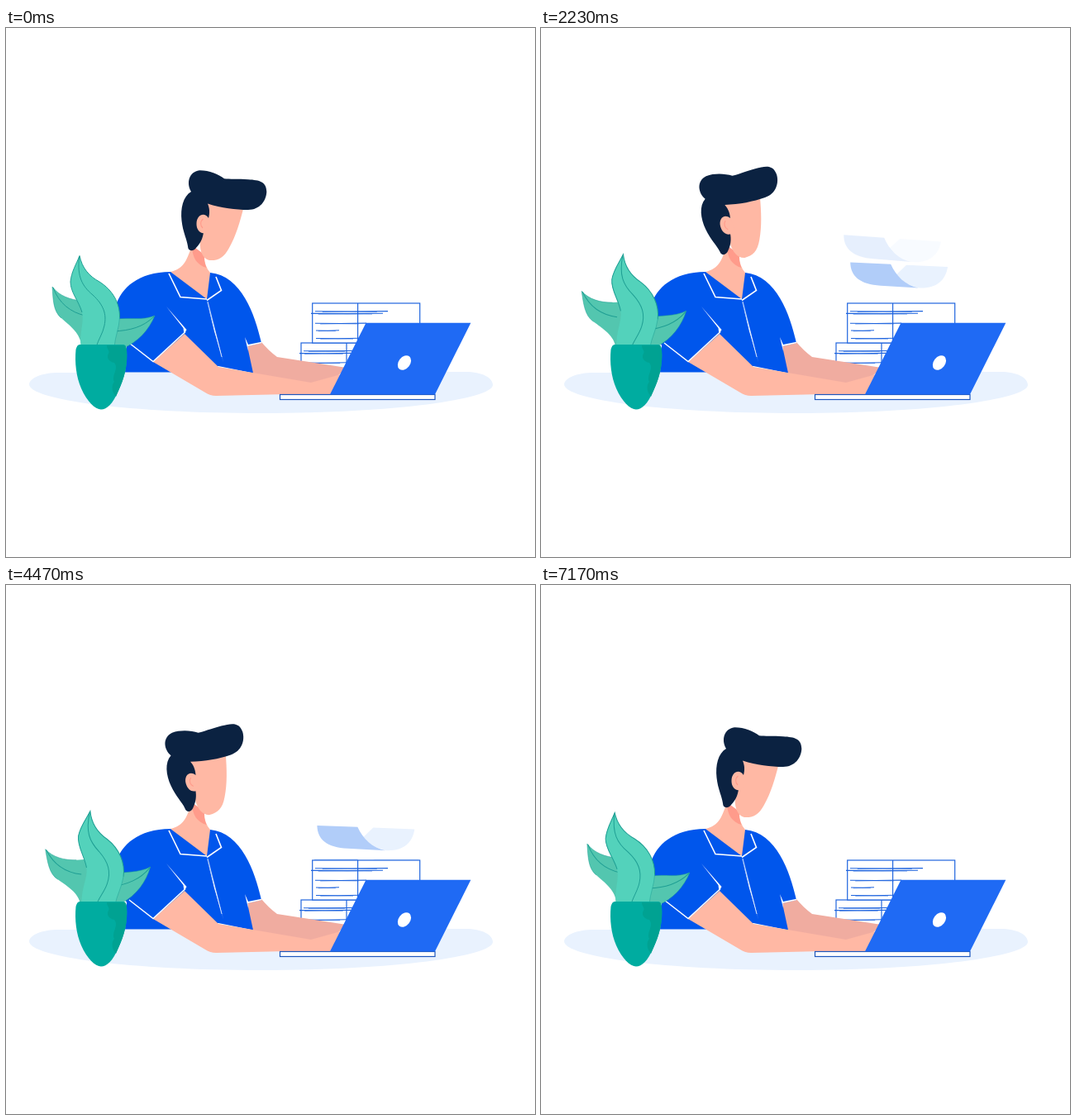
An HTML page with a canvas for the animation above (7.21 s loop, 640 px wide and 640 px high).

```html
<!DOCTYPE html>
<html lang="en">
<head>
<meta charset="utf-8">
<title>Working at a laptop</title>
<style>
  html, body { margin: 0; width: 100%; height: 100%; overflow: hidden; background: #fff; }
  canvas { display: block; width: 640px; height: 640px; }
</style>
</head>
<body>
<canvas id="stage" width="640" height="640"></canvas>
<script>
const ctx = document.getElementById('stage').getContext('2d');
const LOOP = 7210;

const C = {
  pale: '#e9f2fe', sheet: '#b1cdf9', shirt: '#0056ec', laptop: '#1f6af4', line: '#2065de',
  skin: '#ffb8a4', backSkin: '#f0aca0', blush: '#ff9b8b', hair: '#0b2241',
  pot: '#00aca0', potShade: '#00a292', leaf: '#53d2bb', sideLeaf: '#53c6af', vein: '#1f9f94'
};

const clamp = v => Math.max(0, Math.min(1, v));
const smooth = v => { v = clamp(v); return v * v * (3 - 2 * v); };

function fill(d, color) {
  ctx.fillStyle = color;
  ctx.fill(new Path2D(d));
}

function stroke(d, color, width = 1) {
  ctx.strokeStyle = color;
  ctx.lineWidth = width;
  ctx.stroke(new Path2D(d));
}

function oval(x, y, rx, ry, turn, color) {
  ctx.fillStyle = color;
  ctx.beginPath();
  ctx.ellipse(x, y, rx, ry, turn, 0, Math.PI * 2);
  ctx.fill();
}

function rotated(x, y, degrees, draw) {
  ctx.save();
  ctx.translate(x, y);
  ctx.rotate(degrees * Math.PI / 180);
  ctx.translate(-x, -y);
  draw();
  ctx.restore();
}

function table() {
  fill('M64 417 L556 416 C576 416 589 423 589 432 C588 449 470 466 310 466 ' +
       'C150 466 28 450 28 431 C29 423 44 417 64 417Z', C.pale);
}

// An open sheet that sways down and slips behind the books.
function sheet(t) {
  if (t < 0 || t > 4700) return;
  let x = 371 + 6 * Math.cos((t - 2900) * 0.0015);
  if (t > 2900) x = Math.max(373, x);
  const y = 244.5 + 0.0155 * t + 9e-7 * t * t;
  const tilt = 4.1 * (1 - Math.pow(t / 4300, 1.6));
  ctx.save();
  ctx.globalAlpha = clamp((t - 100) / 800);
  ctx.translate(x, y);
  ctx.rotate(tilt * Math.PI / 180);
  ctx.scale(1 + 0.07 * clamp((t - 3300) / 1000), 1);
  fill('M68 0 L118 0 C116 17 105 27 85 27 C72 25 63 20 56.5 12Z', C.pale);
  fill('M0 0 L49 0 C56 14 68 25 84 27 L38 26.5 C13 26 1 17 0 0Z', C.sheet);
  ctx.restore();
}

function book(x, y, w, h, spine) {
  ctx.fillStyle = '#fff';
  ctx.fillRect(x, y, w, h);
  ctx.strokeStyle = C.line;
  ctx.lineWidth = 1.2;
  ctx.strokeRect(x, y, w, h);
  stroke(`M${spine} ${y} V${y + h}`, C.line, 1.2);
}

function scribble(x1, x2, y) {
  const w = x2 - x1;
  stroke(`M${x1} ${y} L${x1 + w * .5} ${y + .2} L${x2} ${y - .2}`, C.line, 1.1);
  stroke(`M${x1 + w * .1} ${y + .7} L${x1 + w * .45} ${y + .4} L${x1 + w * .85} ${y + .6}`, C.line, .7);
}

function books() {
  book(357, 381, 130, 44, 412);
  book(370.7, 333, 130, 48, 425.6);
  [[374, 462, 342.8], [369, 456, 345.4], [374, 436, 357.3], [375, 403, 366], [375, 428, 375.5],
   [360, 419, 390.7], [355, 417, 393.6], [360, 412, 405]].forEach(s => scribble(...s));
}

function body() {
  fill('M290 384 L309 380 C315 387 321 393 328 398 L412 411 L398 424 L369 430 L296 418Z', C.backSkin);
  fill('M199 295 C160 295 139 315 133 336 L128 352 L146 384 L144 416.6 L204 416.6 L257 409 L299 417.5 ' +
       'L292 385 L309 381 C301 346 285 300 247 296Z', C.shirt);
  fill('M178 404 L216 370 L257 410 L369 429 L398 421 L412 417 L400 443 L330 443.2 ' +
       'L254 445 Q247 445 241 441Z', C.skin);

  // neck and its shadow
  fill('M224 266 C218 282 215 291 199 295 L243 328 L247 296 Q240 288 240 277Z', C.skin);
  fill('M225 263 C225 279 232 287 242.5 290 C240 284 239.5 280 240 274Z', C.blush);

  ctx.lineJoin = 'miter';
  stroke('M197 297 L211 325.5 L243 328', '#fff', 1.6);
  stroke('M254 301 L260.5 317.5 L243 329.5', '#fff', 1.6);
  fill('M242.5 328 L263 404 L252 367Z', '#fff');
  stroke('M244 331 L261 398', '#fff', .8);
  fill('M194 337 L218.5 365 L215.5 370.5 L214.5 363Z', '#fff');
  stroke('M149 381 L178 403.5 L217 367.5', '#fff', 1.5);
  fill('M289 374 L293 383 L309 379.7 L309 381.3 L292.5 385 L293 391Z', '#fff');
}

function laptop() {
  ctx.fillStyle = '#fff';
  ctx.fillRect(331.5, 443.5, 187.5, 6);
  ctx.strokeStyle = '#1e57bd';
  ctx.lineWidth = 1.2;
  ctx.strokeRect(331.5, 443.5, 187.5, 6);
  fill('M435.5 356.7 H562.3 L519 443.3 H392Z', C.laptop);
  oval(482, 405, 7, 9.7, .66, '#fff');
}

function head() {
  fill('M238 205 L287.5 217 C283 235 278 252 270 266 C263 279 256 281.5 246 281 ' +
       'C238 279 234 270 235 258Z', C.skin);
  fill('M224 198 C214 204 211 218 212.5 233 C214 247 219 256 220 264 C220 270 226 271 230 266 ' +
       'C237 259 239 250 239 246 L240 230 L245 230 C247 223 246 217 244 212.5 ' +
       'C261 218 278 220 293 220 C307 220 315 209 315.3 198 C315 186 307 184 293 183.2 ' +
       'C281 182.5 270 183 264 182.3 C257 177 245 172 234 172.3 C221 174 218 188 224 198Z', C.hair);
  fill('M245 230 C240 222 231 226 230.5 236 C230 244 235 249 240 248 L246 244Z', C.skin);
  stroke('M238.5 231 C234.5 234 235 239 238 242', C.blush, 1.1);
}

function plant(sway) {
  rotated(113, 393, -sway, () => {
    fill('M56 313 C64 324 78 329 92 330 L118 331 L112 384 L91 385 C91 370 77 360 67 351 ' +
         'C57 343 57 328 56 313Z', C.sideLeaf);
    stroke('M57 314 C64 333 78 344 96 348', C.vein);
    stroke('M92 330 C78 329 64 324 56 313 C57 328 57 343 67 351', C.vein, .5);
    fill('M180 348 C165 354 150 350 134 352 L118 386 L140 388 C160 380 173 365 180 348Z', C.sideLeaf);
    stroke('M179 349 C166 362 150 366 130 367', C.vein);
    stroke('M134 352 C150 350 165 354 180 348 C173 365 160 380 143 387', C.vein, .5);
  });
  rotated(113, 393, sway, () => {
    fill('M89 275.5 C92 290 100 300 113 307 C129 317 138 333 137.5 350 C137 363 132 373 131 388 ' +
         'L91 388 C88 370 95 356 92 344 C88 330 78 320 78 307 C79 295 85 286 89 275.5Z', C.leaf);
    stroke('M92 344 C88 330 78 320 78 307 C79 295 85 286 89 275.5 C92 290 100 300 113 307 ' +
           'C129 317 138 333 137.5 350', C.vein, 1);
    stroke('M137.5 350 C137 363 132 373 131 386', C.vein, .5);
    stroke('M88.5 277 C86 301 92 312 105 323 C118 335 122 346 119 360 C117 370 112 376 109 386', C.vein);
  });
  fill('M89 383 H142 Q145 383 146 389 C147.5 408 143 424 136 439 C129 455 122 461.5 115 461.5 ' +
       'C108 461.5 98 452 91 436 C85 422 83 405 84.5 389 Q86 383 89 383Z', C.pot);
  fill('M122 384 H142 Q145 383 146 389 C147.5 408 143 424 136 439 L133 446 C128 440 127 433 131 428 ' +
       'C127 421 137 412 131 405 C125 404 121 399 124 394 C126 390 122 389 122 384Z', C.potShade);
}

function headTurn(t) {
  const away = smooth(t / 1620);
  const back = Math.pow(clamp((t - 4180) / 1940), 1.75);
  return -19 * (away - back);
}

function frame(now) {
  const t = now % LOOP;
  const half = LOOP / 2;
  ctx.fillStyle = '#fff';
  ctx.fillRect(0, 0, 640, 640);
  table();
  sheet(t);
  sheet(t - 1870);
  books();
  body();
  laptop();
  rotated(237.3, 278, headTurn(t), head);
  plant(8.2 * (1 - Math.abs(t - half) / half));
}

let start;
function tick(now) {
  if (start === undefined) start = now;
  frame(now - start);
  requestAnimationFrame(tick);
}
frame(0);
requestAnimationFrame(tick);
</script>
</body>
</html>
```
